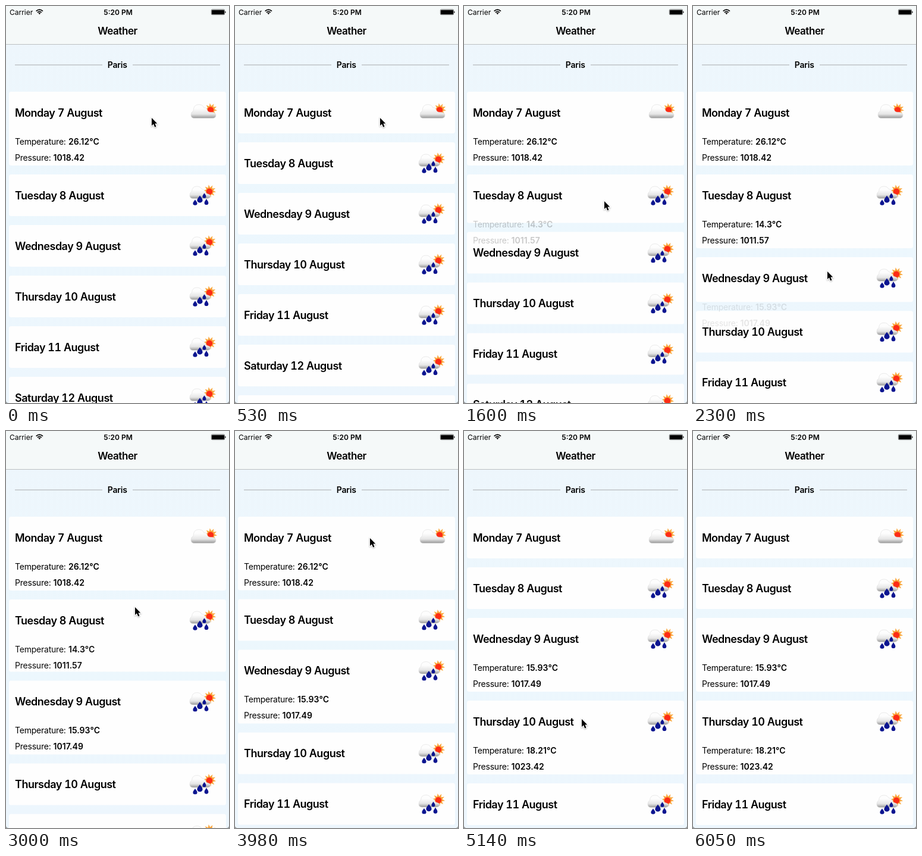
Recreate the animation shown at these times as an HTML page. Size 375x667 px, loop 6120 ms.

```html
<!DOCTYPE html>
<html lang="en">
<head>
<meta charset="utf-8">
<title>Weather</title>
<style>
  html, body { margin: 0; width: 100%; height: 100%; overflow: hidden; background: #edf6fd; }
  svg { display: block; width: 375px; height: 667px; font: 14px Inter, Roboto, sans-serif; }
  text { white-space: pre; }
  .semi { font-weight: 600; }
  .day { font-size: 18px; font-weight: 600; letter-spacing: -.5px; font-variant-numeric: tabular-nums; }
  .label { letter-spacing: -.22px; }
  .value { font-weight: 600; letter-spacing: .05px; }
</style>
</head>
<body>
<svg id="stage" viewBox="0 0 375 667">
  <defs>
    <linearGradient id="sky" x2="0" y2="1">
      <stop stop-color="#eef6fc"/><stop offset=".5" stop-color="#ecf7fd"/><stop offset="1" stop-color="#edf6fd"/>
    </linearGradient>
    <linearGradient id="cloudFill" x2="0" y2="1">
      <stop offset=".3" stop-color="#fdfdfd"/><stop offset=".7" stop-color="#e6e6e6"/><stop offset="1" stop-color="#979797"/>
    </linearGradient>
    <filter id="shade" x="-50%" y="-50%" width="200%" height="200%">
      <feDropShadow dx="0" dy="1" stdDeviation=".8" flood-opacity=".35"/>
    </filter>
    <path id="drop" d="M0 -6C1.500 -3 4 -1 4 2A4 4 0 0 1 -4 2C-4 -1 -1.500 -3 0 -6Z" fill="#0c1590"/>
    <g id="sun"></g>
    <g id="cloudy">
      <use href="#sun" x="344.500" y="30"/>
      <path d="M317 44.500Q311 44.500 311 39Q311 34 315 32.500Q315 21.500 324 21.500Q331 21.500 333 27Q337 26 338.500 31Q340 35 346 34.500Q353 35 353 39.500Q353 44.500 347 44.500Z" fill="url(#cloudFill)" stroke="#dedede" stroke-width=".6"/>
    </g>
    <g id="rainy">
      <use href="#sun" x="342.500" y="28"/>
      <path d="M314 40.500Q309 40 309 35Q309 30 312.500 28.500Q313 20 321 20Q327 20 329 24.500Q333 24 335 29Q337 33 340 33Q344 34 344 37Q343 40.500 338 40.500Z" fill="url(#cloudFill)" stroke="#dedede" stroke-width=".6"/>
      <use href="#drop" transform="translate(326 41.500) scale(1.150 1)"/>
      <use href="#drop" transform="translate(318 47) scale(.9 .8)"/>
      <use href="#drop" transform="translate(333.500 35.500) scale(.75 .7)"/>
      <use href="#drop" transform="translate(337 46) scale(.85)"/>
    </g>
  </defs>

  <rect width="375" height="667" fill="url(#sky)"/>
  <rect width="375" height="64" fill="#f5f9f9"/>
  <rect y="64" width="375" height="1" fill="#bcc1c3"/>

  <text x="6" y="14.500" font-size="12">Carrier</text>
  <g fill="none" stroke="#000" stroke-width="1.700">
    <path d="M50.600 8.600Q56.300 3.800 62 8.600M52.800 10.900Q56.300 8 59.800 10.900"/>
    <path d="M54.300 12.100Q56.300 10.600 58.300 12.100L56.300 14.200Z" fill="#000" stroke="none"/>
  </g>
  <text class="semi" x="188.500" y="14.500" font-size="12" text-anchor="middle">5:20 PM</text>
  <rect x="345.250" y="5.750" width="22.500" height="9" rx="1.800" fill="none" stroke="#000" stroke-width=".5"/>
  <rect x="346" y="6.700" width="21" height="7.300" rx="1"/>
  <path d="M368.300 8.500Q369.600 9 369.600 10.200Q369.600 11.500 368.300 12Z"/>

  <text class="semi" x="187.500" y="48" font-size="17" letter-spacing="-.45" text-anchor="middle">Weather</text>
  <path d="M15 99H162M213 99H360" stroke="#cbd0d4" stroke-width="2"/>
  <text class="semi" x="187.300" y="104" letter-spacing="-.2" text-anchor="middle">Paris</text>

  <g id="cards"></g>
  <g id="details"></g>
  <path d="M0 667V663.500Q.5 666.500 3.500 667ZM375 667V663.500Q374.500 666.500 371.500 667Z" fill="#8d9295"/>
  <path id="cursor" d="M0 0V13L3 10.300L5.200 15.400L7.500 14.400L5.400 9.500H9.300Z" stroke="#fff" stroke-width="1.800" paint-order="stroke" filter="url(#shade)"/>
</svg>
<script>
const LOOP = 6120, FADE = 300, TOP = 144, GAP = 15, CLOSED = 70, EXTRA = 54;
const $ = id => document.getElementById(id);

const days = [
  ['Monday 7 August', '26.12°C', '1018.42'],
  ['Tuesday 8 August', '14.3°C', '1011.57'],
  ['Wednesday 9 August', '15.93°C', '1017.49'],
  ['Thursday 10 August', '18.21°C', '1023.42'],
  ['Friday 11 August'],
  ['Saturday 12 August'],
  ['Sunday 13 August']
];

// Each event advances in evenly spaced steps; lead is the card's head start in ms.
const events = [
  { start: 90, end: 350, steps: 4, card: 0, open: false },
  { start: 530, to: [244, 188] },
  { start: 800, end: 1240, steps: 6, card: 0, open: true, to: [237, 320] },
  { start: 1600, to: [236, 328] },
  { start: 1600, end: 2120, steps: 7, card: 1, open: true, lead: 96, to: [226, 446] },
  { start: 2300, end: 2730, steps: 6, card: 2, open: true, to: [217, 296] },
  { start: 3000, end: 3530, steps: 7, card: 1, open: false, lead: 45, to: [225, 182] },
  { start: 3620, to: [227, 180] },
  { start: 3980, end: 4510, steps: 7, card: 0, open: false, lead: 20, to: [198, 484] },
  { start: 4870, end: 5140, steps: 4, card: 3, open: true },
  { start: 5410, to: [246, 560] },
  { start: 5500, to: [307, 643] },
  { start: 5590, to: [400, 700] }
];

const clamp = v => Math.min(1, Math.max(0, v));
const smooth = s => s * s * (3 - 2 * s);

// cubic-bezier(.42, 0, .58, 1)
function easeInOut(x) {
  let lo = 0, hi = 1;
  for (let i = 0; i < 20; i++) {
    const s = (lo + hi) / 2, r = 1 - s;
    if (3 * r * r * s * .42 + 3 * r * s * s * .58 + s ** 3 < x) lo = s; else hi = s;
  }
  return smooth(hi);
}

function buildSun() {
  const points = Array.from({ length: 20 }, (_, i) => {
    const r = i % 2 ? 5.8 : 10.8, a = i * Math.PI / 10 + .15;
    return `${(r * Math.cos(a)).toFixed(2)},${(r * Math.sin(a)).toFixed(2)}`;
  });
  $('sun').innerHTML = `<polygon points="${points.join(' ')}" fill="#f9a63a"/>
    <circle r="6.4" fill="#fba23c"/><circle cx="-.5" cy=".7" r="5.2" fill="#fc2c16"/>`;
}

function buildCards() {
  $('cards').innerHTML = days.map(([name], i) => `<g>
    <rect x="5" width="365" height="${CLOSED}" rx="3.5" fill="#fefefe"/>
    <text class="day" x="15" y="41.5">${name}</text>
    <use href="#${i ? 'rainy' : 'cloudy'}"/></g>`).join('');
  $('details').innerHTML = days.map(([, temperature, pressure]) => temperature ? `<g>
    <text class="label" x="15" y="88.5">Temperature:</text><text class="value" x="105" y="88.5">${temperature}</text>
    <text class="label" x="15" y="115.5">Pressure:</text><text class="value" x="79.5" y="115.5">${pressure}</text></g>` : '<g></g>').join('');
}

function stateAt(t) {
  const open = days.map((_, i) => i ? 0 : 1);
  let cursor = [245, 188];
  for (const { start, end, steps, card, open: opens, lead = 65, to } of events) {
    if (t < start) break;
    let move = 1;
    if (steps) {
      const span = (end - start) / (steps - 1);
      const step = Math.min(steps - 1, Math.floor((t - start) / span + .02));
      const p = easeInOut(clamp((lead + step * span) / FADE));
      open[card] = opens ? p : 1 - p;
      move = smooth(clamp((step - steps + 4) / 3));
    }
    if (to) cursor = cursor.map((v, i) => v + (to[i] - v) * move);
  }
  return { open, cursor };
}

function render(t) {
  const { open, cursor } = stateAt(t);
  let y = TOP;
  open.forEach((p, i) => {
    const card = $('cards').children[i], detail = $('details').children[i];
    const height = CLOSED + EXTRA * p;
    card.setAttribute('transform', `translate(0 ${y})`);
    card.firstElementChild.setAttribute('height', height);
    detail.setAttribute('transform', `translate(0 ${y})`);
    detail.setAttribute('opacity', p);
    y += height + GAP;
  });
  $('cursor').setAttribute('transform', `translate(${cursor})`);
}

buildSun();
buildCards();
const began = performance.now();
function frame() {
  render((performance.now() - began) % LOOP);
  requestAnimationFrame(frame);
}
frame();
</script>
</body>
</html>
```
